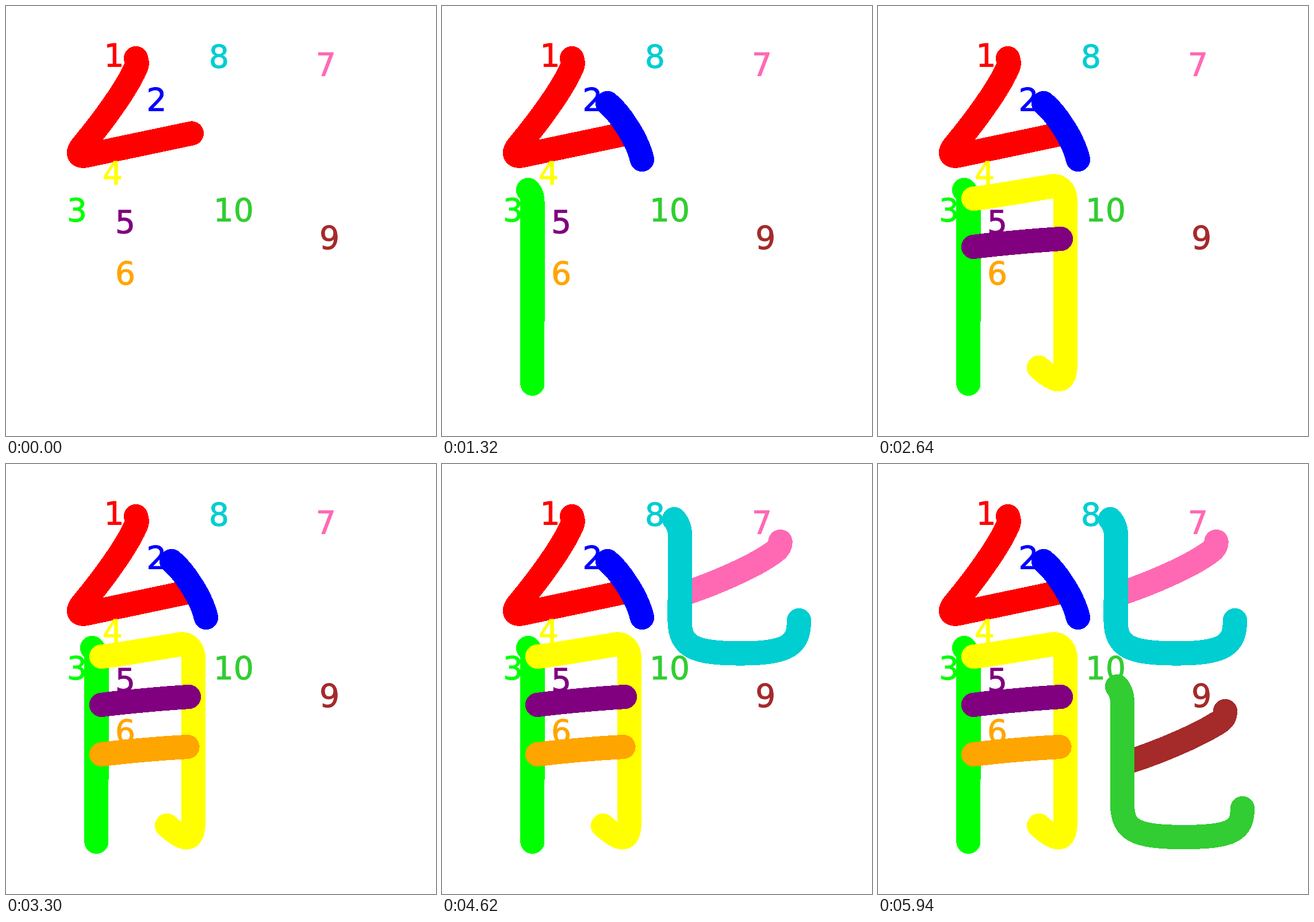
Write an HTML page that moves like this. It is 748 by 748 pixels and loops after 6.6 s.

```html
<!DOCTYPE html>
<html lang="en">
<head>
<meta charset="utf-8">
<title>Stroke order</title>
<style>
  html, body { margin: 0; width: 100%; height: 100%; overflow: hidden; background: #fff; }
  svg { display: block; width: 100%; height: 100%; }
  path { fill: none; stroke-width: 42.2; stroke-linecap: round; stroke-linejoin: round; shape-rendering: crispEdges; }
  text { font: 54.9px "DejaVu Sans", sans-serif; stroke-width: 1; }
</style>
</head>
<body>
<svg viewBox="0 0 748 748"><g id="strokes"></g><g id="labels"></g></svg>
<script>
const STEP = 660;

// color, label x, label baseline, stroke path
const strokes = [
  ["red", 170.6, 104.6, "M226,91 C228,97 229,101 225,109 C210,143 172,196 134,242 C122,256 126,263 140,260 L323,221.5"],
  ["blue", 244.5, 181.8, "M288,169 C310,187 340,232 348,267"],
  ["lime", 106, 374, "M150,320 C155,325 157.5,333 157.5,342 V546 L156.8,566 V636 L157.3,657"],
  ["yellow", 168, 310, "M166,335 C190,333 245,323 295,315 C316,309 326,321 326,341 V620 C326,656 314,659 280,629"],
  ["purple", 190, 394.6, "M166,419 C200,414.5 270,408 318,405"],
  ["orange", 190, 483.8, "M166,505 C200,501 270,494.5 315.5,492"],
  ["hotpink", 539, 120.7, "M588.5,135 C589,143 584,149 575,155 C543,178 477,207 426,224"],
  ["darkturquoise", 353, 106.7, "M404,96 C410,103 414,112 414,124 C414,140 413.5,180 413.5,272 C413.5,318 438,329.5 520,329.5 C605,329.5 621,313 621,272"],
  ["brown", 545.3, 422.3, "M604,430 C604,438 601,445 590,451 C558,471 495,499 439,517"],
  ["limegreen", 361, 374, "M416,387 C422,394 425,403 425,415 V592 C425,638 449,649 532,649 C617,649 634,637 634,599"]
];
const duration = STEP * strokes.length;

function add(parentId, tag, attributes) {
  const node = document.createElementNS("http://www.w3.org/2000/svg", tag);
  for (const [name, value] of Object.entries(attributes)) node.setAttribute(name, value);
  return document.getElementById(parentId).appendChild(node);
}

strokes.forEach(([color, x, y, d], i) => {
  add("labels", "text", { x, y, fill: color, stroke: color }).textContent = i + 1;
  const path = add("strokes", "path", { d, stroke: color });
  if (i === 0) return;
  const offset = i / strokes.length;
  path.animate([
    { opacity: 0, offset: 0 },
    { opacity: 0, offset },
    { opacity: 1, offset },
    { opacity: 1, offset: 1 }
  ], { duration, iterations: Infinity });
});
</script>
</body>
</html>
```
